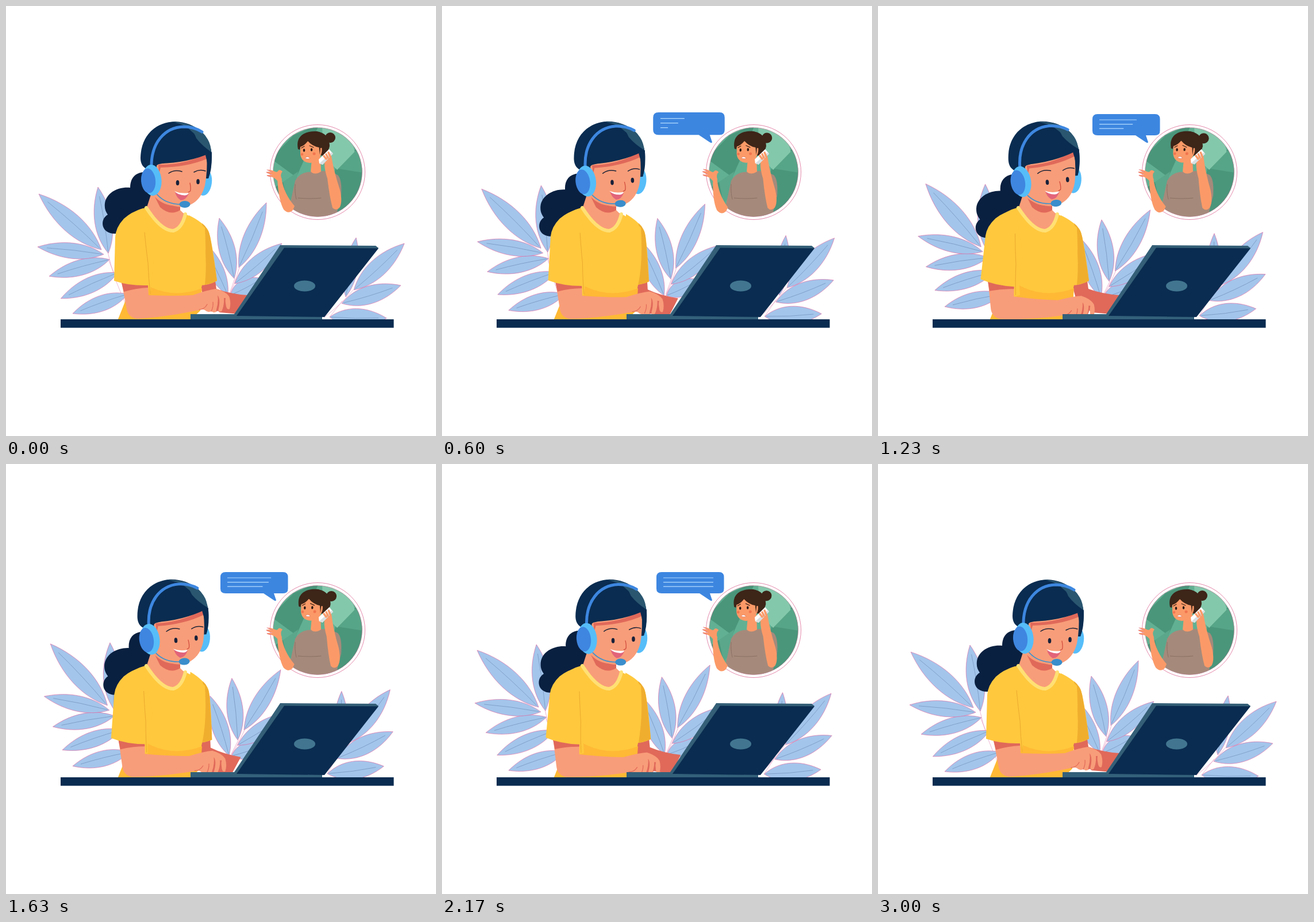
These frames come from a looping animation (748 by 748 pixels, 3.03 s). An HTML page:

```html
<!DOCTYPE html>
<html lang="en">
<head>
<meta charset="utf-8">
<title>Support call</title>
<style>
html, body { margin: 0; width: 100%; height: 100%; overflow: hidden; background: #fff; }
svg { display: block; width: 100vw; height: 100vh; }
.leaf { fill: #a4c5eb; stroke: #e0609a; stroke-width: .6; }
.vein { fill: none; stroke: #7c9cc6; stroke-width: .9; }
.stem { fill: none; stroke: #e79abf; stroke-width: .7; }
.line { fill: none; stroke-linecap: round; stroke-linejoin: round; }
.navy { fill: #0a2c50; }
.shirt { fill: #ffc83d; }
.skin { fill: #f89d79; }
.shade { fill: #e0695a; }
.caller { fill: #fb9a68; }
.brown { fill: #3d2518; }
</style>
</head>
<body>
<svg viewBox="0 0 748 748">
  <defs>
    <clipPath id="disc"><circle cx="542" cy="289" r="77.5"/></clipPath>
  </defs>

  <g id="plantL"><path class="stem" d="M214 530Q188 480 176 424M188 465L178 441"/></g>
  <g id="plantM"><path class="stem" d="M384 514Q398 485 406 455M389 500L398 474"/></g>
  <g id="plantR"><path class="stem" d="M553 542Q582 520 604 494M563 541L585 513"/></g>

  <!-- agent -->
  <g id="tail">
    <path fill="#0a2040" d="M240 289C224 290 216 300 216 316C196 314 175 324 172 343C171 352 173 357 177 363C166 369 165 385 175 392C182 397 191 397 199 394L262 365L262 300Z"/>
  </g>

  <g id="farArm">
    <path class="shade" d="M336 478L364 478L366 492Q390 501 420 503L406 536L372 533L345 512Z"/>
    <path class="shirt" d="M318 364Q343 376 352 391Q358 405 367 478Q352 486 337 486L320 480Z"/>
    <path fill="#f0ae2e" d="M341 378Q352 386 355 401Q361 435 367 478Q357 483 346 485Q351 435 341 378Z"/>
  </g>

  <path class="shirt" d="M245 350Q222 356 208 370L205 400L214 495L205 520L195 545L324 545L337 520L340 490Q350 450 346 386Q331 369 303 358L285 370Z"/>
  <path fill="#ffb935" d="M246 486Q290 510 341 491L338 530L322 545L195 545L207 515L247 503Z"/>
  <path class="skin" d="M254 322L245 350Q266 384 290 389Q305 384 310 362L302 354L302 340Z"/>
  <path class="shade" d="M259 332Q276 350 303 347L303 355Q286 366 268 350Z"/>
  <path class="line" stroke="#ffe074" stroke-width="6" stroke-linecap="butt" d="M244 351Q270 391 291 391Q306 387 312 362"/>

  <g id="nearArm">
    <path class="skin" d="M201 480L247 486L248 503Q290 505 325 503Q350 494 365 492Q382 496 388 505Q392 516 389 527Q385 529 383 523L381 511Q379 524 375 531Q370 533 369 528Q367 533 361 533L357 531Q351 534 346 529Q342 527 335 529Q280 541 228 544Q213 542 210 528Z"/>
    <path class="shade" d="M200 478L247 484L247 490Q226 491 205 497Z"/>
    <path class="shade" d="M368 503Q374 510 369 530Q365 533 366 528Q370 515 368 503ZM382 508Q381 521 376 530Q380 518 379 508Z"/>
    <path class="line" stroke="#e0695a" stroke-width="1.2" d="M336 528Q345 528 350 519M357 531Q361 523 360 515"/>
    <path class="shirt" d="M238 352Q218 358 205 370Q191 385 190 402L188 478Q214 487 247 486L251 500L258 430Z"/>
    <path class="line" stroke="#eba92f" stroke-width="1" d="M241 394Q244 425 247 447Q248 475 251 500"/>
  </g>

  <g id="head">
    <ellipse cx="345" cy="307" rx="13" ry="23" fill="#56bdf9" transform="rotate(8 345 307)"/>
    <path class="navy" d="M252 286C238 283 234 274 234 264C235 225 260 202 294 201C333 202 358 230 358 262Q358 286 352 300L345 300L270 320Z"/>
    <path fill="#2a5670" d="M287 201Q335 203 351 232Q357 242 357 257Q343 235 314 210Q302 204 287 201Z"/>
    <path class="skin" d="M262 276L349 258Q351 286 346 312Q340 336 322 345Q307 352 293 348Q272 343 258 329L262 300Z"/>
    <path class="shade" d="M265 276Q310 277 348 257L349 266Q316 280 269 281L266 292Z"/>
    <path class="navy" d="M236 258Q265 215 315 218Q348 230 357 255Q318 273 266 274L250 289Z"/>
    <path fill="#2a5670" d="M318 207Q350 222 357 254Q341 243 331 230Q326 217 318 207Z"/>
    <path class="navy" d="M347 259L358 254Q358 282 352 300Q352 278 347 259Z"/>
    <path class="line" stroke="#3d87e0" stroke-width="5" d="M253 281C252 238 276 211 309 210Q327 210 341 219"/>
    <g transform="rotate(-5 254 303)">
      <ellipse cx="254" cy="303" rx="16.5" ry="27" fill="#56bdf9"/>
      <ellipse cx="247.5" cy="303.5" rx="12.5" ry="21.5" fill="#3f86e0"/>
    </g>
    <path class="line" stroke="#1c2438" stroke-width="1.5" d="M283 291Q293 284 306 288M327 289Q337 283 347 287"/>
    <ellipse cx="298.5" cy="307.5" rx="2.8" ry="4.5" fill="#17213a"/>
    <ellipse cx="334" cy="305.5" rx="2.8" ry="4.5" fill="#17213a"/>
    <path class="line" stroke="#d14d3f" stroke-width="1.3" d="M320 308Q322 317 320.5 322L317 324"/>
    <path fill="#e2647a" d="M294 323Q304 329 318 326Q313 338 304 338Q296 333 294 323Z"/>
    <path fill="#fff" d="M293 322Q304 327 318 325Q316 329 311 329.500Q299 329 293 322Z"/>
    <path class="line" stroke="#3b93cf" stroke-width="1.7" d="M263 328Q278 345 305 345"/>
    <ellipse cx="311" cy="345" rx="9.5" ry="6" fill="#3a8ecb"/>
  </g>

  <!-- laptop and desk -->
  <path fill="#33607a" d="M321 536L400 536L550 540L550 546L321 546Z"/>
  <path fill="#345f77" d="M477 416L643 417L648 421L640 430L403 540L395 539Z"/>
  <path class="navy" d="M484 420.5L648 421.5L554 541L401 539Z"/>
  <ellipse cx="519.5" cy="487" rx="18.5" ry="9.5" fill="#427690"/>
  <rect class="navy" x="95" y="545" width="579.5" height="14.7"/>

  <!-- caller -->
  <circle cx="542" cy="289" r="82.5" fill="#fff" stroke="#dd6b96" stroke-width=".8"/>
  <g clip-path="url(#disc)">
    <rect x="464" y="211" width="156" height="156" fill="#62b093"/>
    <path fill="#4a967b" d="M464 262L500 225L545 205L522 260L505 298L464 268ZM574 278L622 238L622 370L555 370ZM464 318L482 306L500 370L464 370Z"/>
    <path fill="#84c8ab" d="M550 208L600 228L607 255L576 285L552 262Z"/>
    <path fill="#57a588" d="M607 253L622 238L622 290L578 283Z"/>
    <path fill="#5aa78b" d="M482 306L508 288L500 330L490 345Z"/>
    <path fill="#a58a7b" d="M524 289Q509 292 503 304L494 345L505 370L573 370L583 330Q585 302 577 294Q566 288 552 287Z"/>
    <path class="line" stroke="#8a7063" stroke-width="1" d="M508 334Q530 336 548 334M503 310Q502 325 505 336"/>
  </g>
  <circle cx="542" cy="289" r="77.5" fill="none" stroke="#d9789c" stroke-width=".5"/>
  <g id="callerArm">
    <path class="caller" d="M472 300L479 299Q483 326 502 348L499 355Q491 363 483 354Q474 338 472 300Z"/>
    <path class="caller" d="M472 304Q468 299 461 297Q454 297 454 294L464 294L453 290Q452 287 463 289L454 285Q459 284 468 288Q472 290 474 286Q477 284 481 288Q476 292 480 302Z"/>
    <path class="line" stroke="#dd5f83" stroke-width=".7" d="M454 285L463 289M453 289L463 294M454 295L461 297"/>
  </g>
  <path class="caller" d="M532 266L530 288Q537 295 548 288L547 262Z"/>
  <g id="callerHead">
    <circle class="brown" cx="564" cy="229" r="9"/>
    <path class="brown" d="M540 218Q562 221 563 243Q562 252 553 261L540 258Z"/>
    <path class="caller" d="M512 240L540 230L549 245Q551 255 546 262Q540 272 529 273Q514 272 512 258Z"/>
    <path class="brown" d="M508 249C503 226 520 217 540 218Q557 222 557 246L547 247L546 259L544.5 246Q533 244 525 235Q519 243 512 245L511 250Z"/>
    <ellipse cx="518.5" cy="251" rx="1.8" ry="2.7" fill="#2c1b16"/>
    <ellipse cx="531.5" cy="250" rx="1.8" ry="2.7" fill="#2c1b16"/>
    <path class="line" stroke="#3d2518" stroke-width="1.2" d="M514 247L519 244M528 243L535 246"/>
    <circle cx="515" cy="258" r="2.3" fill="#f2754f"/>
    <circle cx="536" cy="257" r="2.5" fill="#f2754f"/>
    <path fill="#fff" stroke="#cf5843" stroke-width=".5" d="M520 265Q524 260 529 265Q525 267 520 265Z"/>
  </g>
  <g id="phoneArm">
    <path class="caller" d="M555 267L566 261Q570 287 581 320Q586 342 580 351Q574 357 568 351Q563 333 559 300Q554 285 554 274Z"/>
    <path fill="#fff" d="M544 267L562 249L568 256L551 276L545 274Z"/>
    <path fill="#d8dfe2" d="M545 274L551 276L569 257L567 254Z"/>
    <path class="line" stroke="#fb9a68" stroke-width="3.5" d="M557 266L553 261M560 264L557 258M564 262L561 255"/>
  </g>

  <!-- speech bubble -->
  <g id="bubble">
    <path fill="#3d86e0" d="M382 188H482Q490.500 188 490.500 196.500V217Q490.500 225 482 225H466L470 237Q469 239 466 237L448 225H382Q373 225 373 217V196.500Q373 188 382 188Z"/>
    <g id="rows" class="line" stroke="#b4dcff" stroke-width="1.2"><path/><path/><path/></g>
  </g>
</svg>

<script>
const LOOP = 3030, END = 3000;
const $ = id => document.getElementById(id);
const clamp = x => Math.min(1, Math.max(0, x));

function addPath(parent, cls, d) {
  const p = document.createElementNS("http://www.w3.org/2000/svg", "path");
  p.setAttribute("class", cls);
  p.setAttribute("d", d);
  $(parent).append(p);
}

function leaf(plant, [bx, by], [tx, ty], half) {
  const dx = tx - bx, dy = ty - by, len = Math.hypot(dx, dy);
  const at = (u, off) => `${(bx + dx * u - dy / len * off).toFixed(1)} ${(by + dy * u + dx / len * off).toFixed(1)}`;
  const w = half / .75;
  addPath(plant, "leaf", `M${at(0, 0)}C${at(.28, w)} ${at(.65, w)} ${at(1, 0)}C${at(.65, -w)} ${at(.28, -w)} ${at(0, 0)}Z`);
  addPath(plant, "vein", `M${at(.03, 0)}Q${at(.45, half * .18)} ${at(.86, 0)}`);
}

// Point on a quadratic curve
const bend = ([a, b, c], u) => a.map((v, k) => v * (1 - u) ** 2 + 2 * b[k] * u * (1 - u) + c[k] * u * u);

// Leaves spread evenly from a stem curve out to a rim curve
function fan(plant, count, stem, rim, half) {
  for (let i = 0; i < count; i++) {
    const u = i / (count - 1);
    leaf(plant, bend(stem, u), bend(rim, u), half);
  }
}

leaf("plantL", [166, 424], [57, 327], 17);
leaf("plantL", [178, 430], [160, 315], 15);
fan("plantL", 4, [[212, 501], [182, 435], [170, 432]], [[116, 535], [85, 505], [55, 419]], 13.5);
leaf("plantM", [386, 503], [338, 405], 14);
leaf("plantM", [397, 474], [371, 369], 14);
fan("plantM", 3, [[390, 503], [398, 487], [405, 455]], [[446, 474], [510, 418], [453, 342]], 14);
leaf("plantR", [591, 506], [609, 403], 12);
fan("plantR", 3, [[563, 541], [584, 517], [605, 494]], [[662, 543], [696, 494], [693, 413]], 15.5);

// 0 to 1 at the peak and back to 0 at the end
function bell(t, peak, end = END) {
  const u = t < peak ? t / peak : 1 - clamp((t - peak) / (end - peak));
  return (1 - Math.cos(Math.PI * u)) / 2;
}

// Repeating 0 to 1 to 0
const wave = (t, period) => (1 - Math.cos(2 * Math.PI * Math.min(t, END) / period)) / 2;

function backOut(u) {
  const x = clamp(u) - 1;
  return 1 + 2.4 * x ** 3 + 1.4 * x ** 2;
}

function turn(id, deg, x, y) {
  $(id).setAttribute("transform", `rotate(${deg.toFixed(3)} ${x} ${y})`);
}

const rows = [...$("rows").children];

function draw(now) {
  const t = now % LOOP;

  turn("plantL", 7 * bell(t, 1250, 2500), 214, 530);
  turn("plantM", 8.4 * bell(t, 1600) ** 1.5, 357, 520);
  turn("plantR", -8.8 * bell(t, 1500) ** .8, 546, 566);

  const nod = -4.5 * bell(t, 1060, 2700);
  turn("head", nod, 285, 360);
  turn("tail", nod, 285, 360);

  // The far hand peaks halfway through each stroke of the near hand
  const stroke = wave(t, 500);
  turn("nearArm", 4.9 * stroke, 215, 365);
  turn("farArm", 5.7 * Math.sin(Math.PI * stroke) ** 2, 345, 390);

  turn("callerHead", 2.7 * bell(t, 1250, 2500), 540, 285);
  turn("callerArm", 5 * wave(t, 1500), 468, 292);
  turn("phoneArm", 2.4 * bell(t, 1300, 2600), 560, 264);

  const pop = backOut((t - 170) / 607) * backOut((2885 - t) / 607);
  $("bubble").setAttribute("visibility", pop > .01 ? "visible" : "hidden");
  $("bubble").setAttribute("transform", `translate(470 238) scale(${pop.toFixed(4)}) translate(-470 -238)`);
  rows.forEach((row, i) => {
    const w = 86 * clamp((t - 300 - 30 * i) / 1800) ** (.45 + .14 * i * i);
    row.setAttribute("d", w > .5 ? `M385.5 ${198 + i * 7.6}h${w.toFixed(1)}` : "");
  });
}

const start = performance.now();
function tick() {
  draw(performance.now() - start);
  requestAnimationFrame(tick);
}
tick();
</script>
</body>
</html>
```
